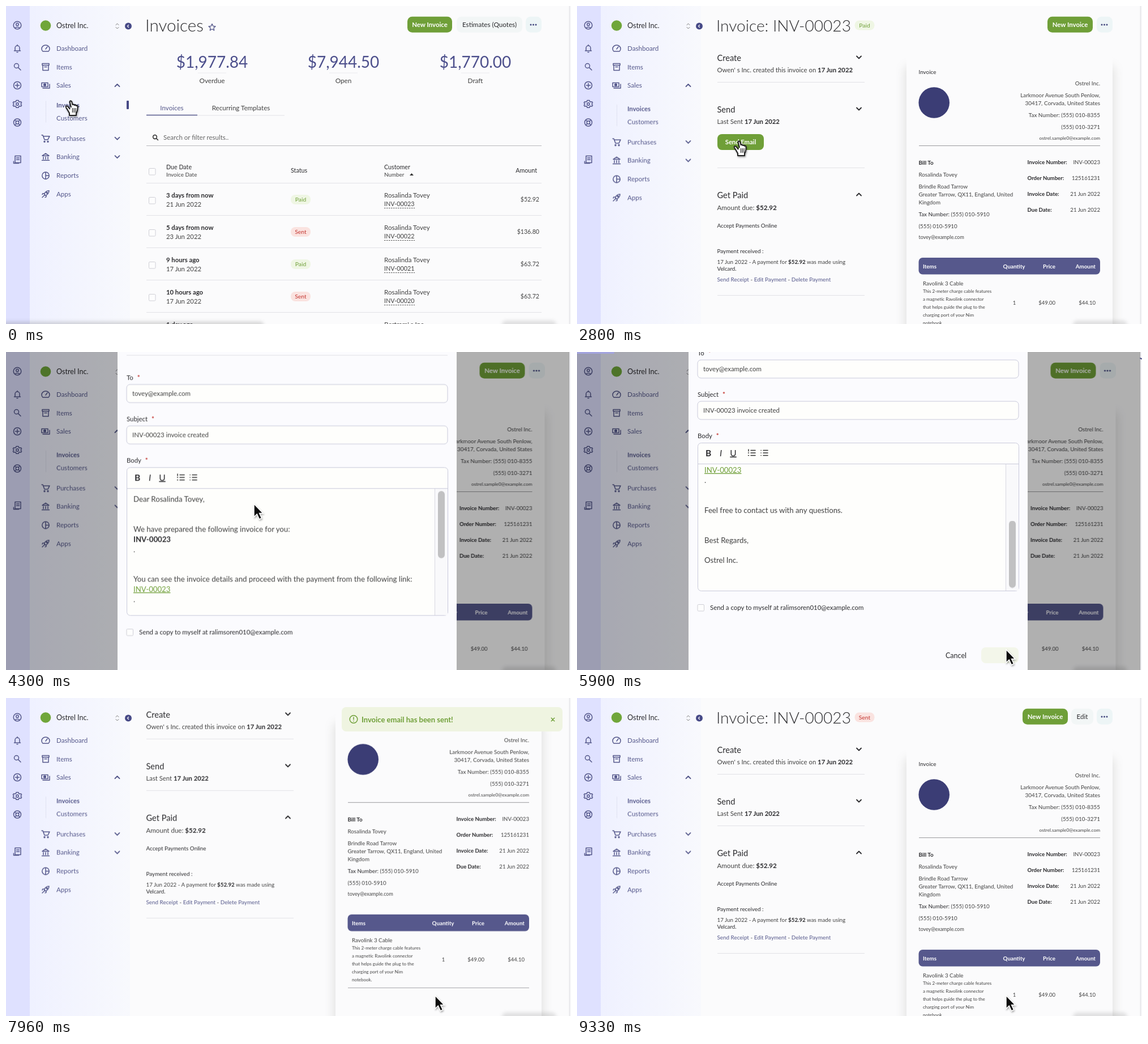
Write an HTML page that moves like this. It is 998x561 px and loops after 10 s.

```html
<!DOCTYPE html>
<html lang="en">
<head>
<meta charset="utf-8">
<title>Invoices</title>
<style>
html,body{margin:0;width:100%;height:100%;overflow:hidden;background:#fbfbfc}
svg{display:block;width:100vw;height:100vh;font-family:Lato,"Open Sans",sans-serif}
text{fill:#424242;white-space:pre}
.b{font-weight:700}.d{fill:#2b2b2e}.l{font-weight:300}
.c{text-anchor:middle}.r{text-anchor:end}
.p{fill:#55588b}.deep{fill:#4c4f8c}.w{fill:#fff}.g{fill:#6f9f38}.red{fill:#c3342f}
.icon{fill:none;stroke:#55588b;stroke-width:1.5;stroke-linecap:round;stroke-linejoin:round}
.line{stroke:#e2e2e7}
.a{animation:10s linear infinite}
.hard{animation:10s step-end infinite}
.ease{animation:10s ease-in-out infinite}

@keyframes list{0%{opacity:1}14.5%,100%{opacity:0}}
@keyframes detail{0%{opacity:0}14.5%,100%{opacity:1}}
@keyframes before{0%{opacity:1}67.8%,100%{opacity:0}}
@keyframes after{0%{opacity:0}67.8%,100%{opacity:1}}
@keyframes nudge{0%{transform:none}28.2%{transform:translateX(5.5px)}67.8%,100%{transform:none}}
@keyframes scroll{
 0%,75%{transform:none}76%,79%{transform:translateY(-27px)}
 79.6%{transform:translateY(-62px)}80%,82%{transform:translateY(-70px)}
 83.3%,85%{transform:translateY(-110px)}86%,90%{transform:translateY(-130px)}
 93.2%,100%{transform:none}}
@keyframes submenu{
 0%,.3%{transform:translateY(-6.5px);opacity:1}3.5%,13%{transform:none;opacity:1}
 14.5%{transform:translateY(-6.5px);opacity:0}18%{transform:translateY(-1.5px);opacity:.7}
 19.5%,67.7%{transform:none;opacity:1}67.8%{transform:translateY(-6.5px);opacity:0}
 72%,100%{transform:none;opacity:1}}
@keyframes lower{0%,.3%{transform:translateY(-6.3px)}3.5%,100%{transform:none}}
@keyframes start{0%,.3%{opacity:1}2.5%,100%{opacity:0}}
@keyframes hover{0%,3%{opacity:0}4.4%,100%{opacity:1}}
@keyframes unfold{0%,20.2%{transform:none}21.3%,67%{transform:translateY(60px)}67.1%,100%{transform:none}}
@keyframes reveal{0%,20.5%{opacity:0}21.3%,67%{opacity:1}67.1%,100%{opacity:0}}
@keyframes dim{0%,28.2%{opacity:0}30.5%,67.7%{opacity:.3}67.8%,100%{opacity:0}}
@keyframes modal{
 0%,28.8%{opacity:0;transform:translateY(-28px)}32%,67.7%{opacity:1;transform:none}
 67.8%,100%{opacity:0;transform:none}}
@keyframes sheet{0%,41%{transform:none}43%{transform:translateY(-78px)}43.6%,100%{transform:translateY(-122px)}}
@keyframes letter{0%,46%{transform:none}49.6%,100%{transform:translateY(-167px)}}
@keyframes thumb{0%,46%{transform:none}49.6%,100%{transform:translateY(95.5px)}}
@keyframes idle{0%{opacity:1}57.3%,100%{opacity:0}}
@keyframes progress{
 0%,58%{transform:scaleX(0)}59%{transform:scaleX(.065)}62.3%{transform:scaleX(.3)}
 63.3%,67.7%{transform:scaleX(1)}67.8%,100%{transform:scaleX(0)}}
@keyframes spinner{0%{opacity:0}58%{opacity:1}63.3%,100%{opacity:0}}
@keyframes toast{0%,70%{opacity:0}72.5%,90%{opacity:1}92.5%,100%{opacity:0}}
@keyframes cursor{
 0%,.3%{transform:translate(107px,167px)}4.6%,18.2%{transform:translate(568px,316px)}
 20.3%,23%{transform:translate(412px,187px)}25.3%,35.6%{transform:translate(279px,238px)}
 37.6%,52.3%{transform:translate(438px,268px)}56%,100%{transform:translate(758px,525px)}}
@keyframes hand{0%{opacity:1}12.8%{opacity:0}25%{opacity:1}30%,100%{opacity:0}}
@keyframes arrow{0%{opacity:0}12.8%{opacity:1}25%{opacity:0}30%,100%{opacity:1}}
</style>
</head>
<body>
<svg id="stage" viewBox="0 0 998 561" preserveAspectRatio="none"></svg>
<script>
// Text is placed by the vertical middle of its capitals.
const text = (x, y, s, cls = '', size = 11.6) =>
  `<text x="${x}" y="${(y + size * .36).toFixed(2)}" font-size="${size}" class="${cls}">${s}</text>`;
const bold = s => `<tspan class="b d">${s}</tspan>`;
const box = (x, y, w, h, fill, r = 0, extra = '') =>
  `<rect x="${x}" y="${y}" width="${w}" height="${h}" rx="${r}" fill="${fill}" ${extra}/>`;
const line = (x1, x2, y, extra = '') =>
  `<line class="line" x1="${x1}" x2="${x2}" y1="${y}" y2="${y}" ${extra}/>`;
const icon = (x, y, d, extra = '') =>
  `<path class="icon" transform="translate(${x} ${y})" d="${d}" ${extra}/>`;
const ring = (x, y, r) => `M${x - r} ${y}a${r} ${r} 0 1 0 ${2 * r} 0a${r} ${r} 0 1 0 ${-2 * r} 0`;
const move = (name, body, kind = 'a') =>
  `<g class="${kind}" style="animation-name:${name}">${body}</g>`;
const chevron = (x, y, up, color = '#55588b') =>
  icon(x, y, up ? 'M-4 2L0-2L4 2' : 'M-4-2L0 2L4-2', `style="stroke-width:1.8;stroke:${color}"`);
const button = (x, w, s) => box(x, 18.7, w, 28, '#6f9f38', 8.5) + text(x + w / 2, 33, s, 'b c w', 11.4);
const softButton = (x, w, s, size) => box(x, 18.7, w, 28, '#f2f6f6', 8.5) + text(x + w / 2, 33, s, 'c d', size);
const dots = box(918, 18.7, 28, 28, '#edf5f6', 8.5) +
  [-4.5, 0, 4.5].map(d => `<circle cx="${931.5 + d}" cy="33" r="1.5" fill="#45487f"/>`).join('');
const badge = (x, y, paid) => box(x, y - 8.5, 35, 17, paid ? '#eff6e4' : '#fae3e0', 8) +
  text(x + 17.5, y, paid ? 'Paid' : 'Sent', 'c ' + (paid ? 'g' : 'red'), 10.3);
const checkbox = (x, y) => box(x, y, 11.5, 11.5, '#fdfdfd', 1.5, 'stroke="#cfcfd6"');

const company = 'Ostrel Inc.', client = 'Rosalinda Tovey', mail = 'tovey@example.com';

function sidebar() {
  const rail = [
    [34, ring(0, 0, 6.8) + ring(0, -1.6, 2.2) + 'M-4.5 5a6 5 0 0 1 9 0'],
    [75, 'M-5.5 4h11M-4 4v-5a4 4 0 0 1 8 0v5M-1 6.5h2M0-6.5v1'],
    [107, ring(-1.5, -1.5, 4) + 'M1.6 1.6L6 6'],
    [140, ring(0, 0, 6.5) + 'M-3.5 0h7M0-3.5v7'],
    [173, ring(0, 0, 2.2) + 'M-2-6.5h4l.6 2 2 .8 2-.4 1 2-1.6 2 1.6 2-1 2-2-.4-2 .8-.6 2h-4l-.6-2-2-.8-2 .4-1-2 1.6-2-1.6-2 1-2 2 .4 2-.8z'],
    [205.5, ring(0, 0, 6.5) + ring(0, 0, 2.7) + 'M-4.5-4.5l2.5 2.5M4.5-4.5l-2.5 2.5M-4.5 4.5l2.5-2.5M4.5 4.5l-2.5-2.5'],
    [271, 'M-4-6.5h10v12h-10zM-6.5 3v3.5h9M-1.5-3h5M-1.5 0h5']
  ].map(([y, d]) => icon(20, y, d)).join('');
  const item = (y, name, d) => icon(70, y, d) + text(89, y, name, 'p');
  const top = item(75, 'Dashboard', 'M-5 5a7 6.5 0 1 1 10 0zM0 1l3-4') +
    item(107.5, 'Items', 'M-6-6h12v3h-12zM-5-3v9h10v-9M-2 0h4') +
    item(140, 'Sales', 'M-7-4.5h11v7h-11zM-5 5h12v-7') +
    '<circle cx="68.5" cy="139" r="2.6" fill="#55588b"/>' + chevron(196.5, 140, true);
  const sub = '<path d="M70.5 174v38" stroke="#e0e1f0"/>' +
    text(89, 181, 'Invoices', 'p b', 11.3) + text(89, 204.5, 'Customers', 'p');
  const low = item(240, 'Purchases', 'M-7-6h2l3 8h6l3-6h-11' + ring(-2, 5.5, 1) + ring(4, 5.5, 1)) + chevron(196.5, 240) +
    item(272.5, 'Banking', 'M-6-2L0-6L6-2zM-4 0v4M0 0v4M4 0v4M-6.5 6h13') + chevron(196.5, 272.5) +
    item(305.5, 'Reports', ring(0, 0, 6.2) + 'M0-6v12M0 0h6') +
    item(338, 'Apps', 'M-2 2c-1-4 3-8 8-8c0 5-4 9-8 8zM-2 2l-4 4M-2-1h-3l-1 2M1 2v3l-2 1' + ring(2.3, -2.2, 1));
  return box(0, 0, 42, 561, '#dfe1ff') + box(42, 0, 177, 561, 'url(#side)') + rail +
    '<circle cx="70" cy="34.5" r="9.3" fill="#70a63a"/>' + text(89, 34.5, company, 'd', 12.6) +
    icon(196.5, 35.5, 'M-2.5-2L0-4.5L2.5-2M-2.5 2L0 4.5L2.5 2', 'style="stroke-width:1;stroke:#777"') +
    '<circle cx="216" cy="35.5" r="6" fill="#474a87"/>' +
    icon(215.5, 35.5, 'M1-2L-1 0L1 2', 'style="stroke:#fff;stroke-width:1.2"') +
    top + move('submenu', sub) + move('lower', low) +
    move('start', box(213, 167, 4, 15, '#474a87', 1));
}

function listPage() {
  const stat = (x, sum, label) => text(x, 98.5, sum, 'c deep', 28) +
    line(x - 25, x + 25, 118, 'opacity=".6"') + text(x, 131.5, label, 'c', 11.8);
  const rows = [
    ['3 days from now', '21 Jun 2022', 1, 'INV-00023', '$52.92'],
    ['5 days from now', '23 Jun 2022', 0, 'INV-00022', '$136.80'],
    ['9 hours ago', '17 Jun 2022', 1, 'INV-00021', '$63.72'],
    ['10 hours ago', '17 Jun 2022', 0, 'INV-00020', '$63.72'],
    ['1 day ago', '16 Jun 2022', 0, 'INV-00019', '$63.72']
  ].map(([due, date, paid, number, sum], i) => {
    const y = 313 + 57 * i;
    return checkbox(252.5, y + 24.5) + text(283, y + 20.5, due, 'b d', 11.3) + text(283, y + 36.5, date, '', 11.3) +
      badge(503, y + 28.5, paid) + text(668, y + 20.5, i < 4 ? client : "Bertram' s Inc.") +
      text(668, y + 36.5, number, '', 10.8) + line(668, 722, y + 43.5, 'style="stroke:#555" stroke-dasharray="2.5 1.5"') +
      text(942, y + 28.5, sum, 'r', 10.6) + line(248, 946, y + 56.5);
  }).join('');
  return text(246, 34.5, 'Invoices', 'l d', 29.6) +
    icon(364, 37.5, 'M0-6L1.8-2L6-1.6L2.8 1.2L3.7 5.5L0 3.2L-3.7 5.5L-2.8 1.2L-6-1.6L-1.8-2z', 'style="stroke-width:1.3"') +
    button(709, 79, 'New Invoice') + softButton(796, 116, 'Estimates (Quotes)', 11.7) + dots +
    stat(364, '$1,977.84', 'Overdue') + stat(596, '$7,944.50', 'Open') + stat(829, '$1,770.00', 'Draft') +
    text(293, 179.5, 'Invoices', 'c p') + text(415, 179.5, 'Recurring Templates', 'c') +
    line(338, 492, 193) + line(248, 338, 192.5, 'style="stroke:#55588b;stroke-width:1.6"') +
    icon(264, 232, ring(-1, -1, 3.4) + 'M1.6 1.6L4.5 4.5', 'style="stroke:#333"') +
    text(278, 231.5, '<tspan fill="#666">Search or filter results..</tspan>', '', 11.5) +
    line(248, 946, 246.5, 'style="stroke:#b9b9bd"') +
    checkbox(252.5, 286.5) + text(283, 284.5, 'Due Date', 'd', 10.7) + text(283, 297, 'Invoice Date', '', 9.9) +
    text(503, 290.5, 'Status', 'd', 10.7) + text(668, 284.5, 'Customer', 'd', 10.7) + text(668, 297, 'Number', '', 9.9) +
    '<path d="M713 299h7l-3.5-4z" fill="#333"/>' + text(938, 290.5, 'Amount', 'r d', 10.7) + line(248, 946, 312.5) +
    move('hover', box(248, 313, 693, 56, '#55588b', 0, 'opacity=".04"')) + rows;
}

function detailPage() {
  const head = (y, s, up) => text(247.5, y, s, 'd', 14.6) + chevron(498, y - 1, up, '#2b2b2e');
  const getPaid = head(273.5, 'Get Paid', true) + text(247.5, 295.5, 'Amount due: ' + bold('$52.92')) +
    text(247.5, 327, 'Accept Payments Online', 'd', 9.9) + text(247.5, 372, 'Payment received :', 'd', 9.9) +
    text(247.5, 391, `17 Jun 2022 - A payment for ${bold('$52.92')} was made using`, '', 9.8) +
    text(247.5, 403.5, 'Velcard.', 'd', 9.8) +
    text(247.5, 422.5, 'Send Receipt <tspan fill="#444">-</tspan> Edit Payment <tspan fill="#444">-</tspan> Delete Payment', 'p', 9.9) +
    line(248, 508, 450.5);
  const left = head(91.5, 'Create') + text(247.5, 113, "Owen' s Inc. created this invoice on " + bold('17 Jun 2022'), '', 11.3) +
    line(248, 508, 134.5) + head(182.5, 'Send') + text(247.5, 204, 'Last Sent ' + bold('17 Jun 2022'), '', 11.3) +
    move('reveal', box(248, 226, 82, 28, '#6f9f38', 8) + text(289, 240, 'Send Email', 'c w b', 11.2)) +
    move('unfold', line(248, 508, 225.5) + getPaid);

  const right = [[136.5, company], [157.5, 'Larkmoor Avenue South Penlow,'], [171.5, '30417, Corvada, United States'],
    [192.5, 'Tax Number: (555) 010-8355'], [213.5, '(555) 010-3271']].map(([y, s]) => text(924, y, s, 'r', 9.9)).join('') +
    text(924, 233.5, 'ostrel.sample0@example.com', 'r', 8.3);
  const bill = [[297, client], [318, 'Brindle Road Tarrow'], [332, 'Greater Tarrow, QX11, England, United'], [346, 'Kingdom'],
    [367, '<tspan class="d">Tax Number:</tspan> (555) 010-5910'], [388, '(555) 010-5910']]
    .map(([y, s]) => text(603.5, y, s, '', 9.8)).join('') + text(603.5, 408, mail, '', 8.9);
  const facts = [['Invoice Number:', 'INV-00023'], ['Order Number:', '125161231'], ['Invoice Date:', '21 Jun 2022'], ['Due Date:', '21 Jun 2022']]
    .map(([k, v], i) => text(795.5, 276 + 28 * i, k, 'b d', 9.6) + text(924, 276 + 28 * i, v, 'r', 9.6)).join('');
  const note = ['This 2-meter charge cable features', 'a magnetic Ravolink connector', 'that helps guide the plug to the', 'charging port of your Nim', 'notebook.']
    .map((s, i) => text(611, 503 + 14 * i, s, '', 8)).join('');
  const sheet = box(580, 106, 368, 700, '#8a8a80', 6, 'opacity=".24" filter="url(#blur)"') + box(582, 88, 364, 706, '#fbfbfc', 6) +
    text(603.5, 116, 'Invoice', 'd', 9.9) + '<circle cx="630.7" cy="170.5" r="27.3" fill="#3b3d75"/>' + right +
    line(604, 924, 246.5, 'style="stroke:#9a9a9e"') + text(603.5, 276, 'Bill To', 'b d', 9.8) + bill + facts +
    box(603.5, 444, 320.5, 29.5, '#56588c', 7) + text(611, 459, 'Items', 'b w', 9.8) + text(772, 459, 'Quantity', 'b w c', 9.8) +
    text(845, 459, 'Price', 'b w r', 9.8) + text(916, 459, 'Amount', 'b w r', 9.8) +
    text(611, 489, 'Ravolink 3 Cable', '', 9.8) + note + text(772.5, 524, '1', 'c', 9.6) +
    text(845, 524, '$49.00', 'r', 9.5) + text(916, 524, '$44.10', 'r', 9.5) + line(604, 924, 573.5, 'style="stroke:#a5a5a9"');

  return move('nudge', move('scroll', text(246, 34.5, 'Invoice: INV-00023', 'l d', 28.1) +
    move('before', badge(490.5, 34, 1) + button(831, 80, 'New Invoice'), 'hard') +
    move('after', badge(490.5, 34, 0) + button(787, 80, 'New Invoice') + softButton(873, 39, 'Edit', 11.6), 'hard') +
    dots + left + sheet), 'hard');
}

function emailModal() {
  const field = (y, label, value) => text(213, y, `${label} <tspan class="red b" dx="4">*</tspan>`, 'd', 11.4) +
    (value ? box(213, y + 12, 567, 32, '#fefefc', 6, 'stroke="#c9cadb"') + text(223, y + 28, value, '', 11.4) : '');
  const tools = [['B', 'b'], ['I', '', 'font-style="italic"'], ['U', '', 'text-decoration="underline"']]
    .map(([s, cls, extra = ''], i) => `<text x="${232 + 22 * i}" y="305.5" font-size="15.5" class="c d ${cls}" ${extra}>${s}</text>`).join('') +
    [309, 331].map((x, i) => icon(x, 300, 'M-2-4.5h8M-2 0h8M-2 4.5h8' + (i ? 'M-6-4.5h.2M-6 0h.2M-6 4.5h.2' : 'M-6-6v3M-6.5 0h1M-6.5 4.5h1'),
      'style="stroke:#333"')).join('');
  const letter = [[338, `Dear ${client},`], [391, 'We have prepared the following invoice for you:'], [409, bold('INV-00023')], [427, '.'],
    [479.5, 'You can see the invoice details and proceed with the payment from the following link:'],
    [497, '<tspan class="g" text-decoration="underline">INV-00023</tspan>'], [515, '.'],
    [568, 'Feel free to contact us with any questions.'], [621, 'Best Regards,'], [656.5, company]]
    .map(([y, s]) => text(225, y, s, '', 13.2)).join('');
  return box(197, 31, 599, 720, '#fbfbfe', 8) + text(213, 58, 'New Email', 'd', 12.6) +
    box(752, 49, 28, 20, '#f2f2f5', 5) + text(766, 58.5, 'esc', 'c d') + line(213, 780, 84.5) +
    field(124, 'To', mail) + field(197, 'Subject', 'INV-00023 invoice created') + field(270, 'Body') +
    box(213.5, 282.5, 567, 261, '#fefefc', 6, 'stroke="#c9cadb"') + line(213.5, 780, 319.5, 'style="stroke:#c9cadb"') + tools +
    `<g clip-path="url(#editor)">${move('letter', letter)}</g>` +
    box(757.5, 320, 22.5, 223, '#f9f9fb', 0) + '<path d="M757.5 320v223" stroke="#d9d9e2"/>' +
    move('thumb', box(763, 324, 12, 118.5, '#c1c1c2', 6)) +
    checkbox(213, 567.5) + text(235, 573, 'Send a copy to myself at ralimsoren010@example.com', 'd', 11.4) +
    text(669.5, 657, 'Cancel', 'c d', 12.6) + box(714, 643, 66, 28, '#f3f6ea', 8) +
    move('idle', box(714, 643, 66, 28, '#6f9f38', 8) + text(747, 657, 'Send', 'c w b', 11.6), 'hard');
}

const toast = box(593, 16, 390, 43, '#eff4e1', 8) +
  icon(614, 37.5, ring(0, 0, 6.8) + 'M0-3.5v4M0 3.2v.2', 'style="stroke:#6f9f38"') +
  text(628, 38, 'Invoice email has been sent!', 'b g', 13) +
  icon(966, 38, 'M-2.7-2.7l5.4 5.4M2.7-2.7l-5.4 5.4', 'style="stroke:#6f9f38"');

const handShape = `<path d="M6 15L3 11Q0 8-1 10Q-2 11 1 15L5 22V26H17V22Q20 18 19.5 10Q19 8 17 9Q16.5 7 14 8Q13 6 10.5 7
  L9 1.5Q7-.8 5.5 1.5L8 12" fill="#fff" stroke="#222" stroke-width="2.1" stroke-linejoin="round"/>
  <path d="M10.5 13v8M13.3 13v8M16 13v8" stroke="#333" stroke-width="1.3"/>`;
const arrowShape = `<path d="M0 0V23L5.3 18L9.5 27L13.5 25L9.5 16.5H16Z" fill="#111" stroke="#fff" stroke-width="1.4"/>`;

document.getElementById('stage').innerHTML = `<defs>
  <linearGradient id="side"><stop stop-color="#eff1ff"/><stop offset="1" stop-color="#f8f9fd"/></linearGradient>
  <filter id="blur" x="-20%" y="-20%" width="140%" height="140%"><feGaussianBlur stdDeviation="9"/></filter>
  <filter id="soft" x="-50%" y="-300%" width="200%" height="700%"><feGaussianBlur stdDeviation="3"/></filter>
  <filter id="shade" x="-50%" y="-50%" width="200%" height="200%"><feDropShadow dx="1" dy="2" stdDeviation="1.5" flood-opacity=".35"/></filter>
  <clipPath id="editor"><rect x="214" y="320" width="543" height="223"/></clipPath></defs>` +
  box(0, 0, 998, 561, '#fbfbfc') + move('list', listPage(), 'hard') + move('detail', detailPage(), 'hard') +
  sidebar() + box(994.5, 0, 2, 561, '#e7e7ea') +
  box(876, 555, 96, 16, '#777', 8, 'opacity=".2" filter="url(#soft)"') +
  move('start', box(-10, 557, 465, 14, '#666', 6, 'opacity=".25" filter="url(#soft)"')) +
  move('dim', box(0, 0, 995, 561, '#000')) + move('modal', move('sheet', emailModal())) +
  move('progress', box(0, 0, 998, 3, '#a3a4df')) +
  move('spinner', icon(996, 14, 'M-1-3l2 1', 'style="stroke-width:2"'), 'hard') +
  move('toast', toast) +
  move('cursor', `<g filter="url(#shade)">${move('hand', handShape, 'hard')}${move('arrow', arrowShape, 'hard')}</g>`, 'ease');
</script>
</body>
</html>
```
